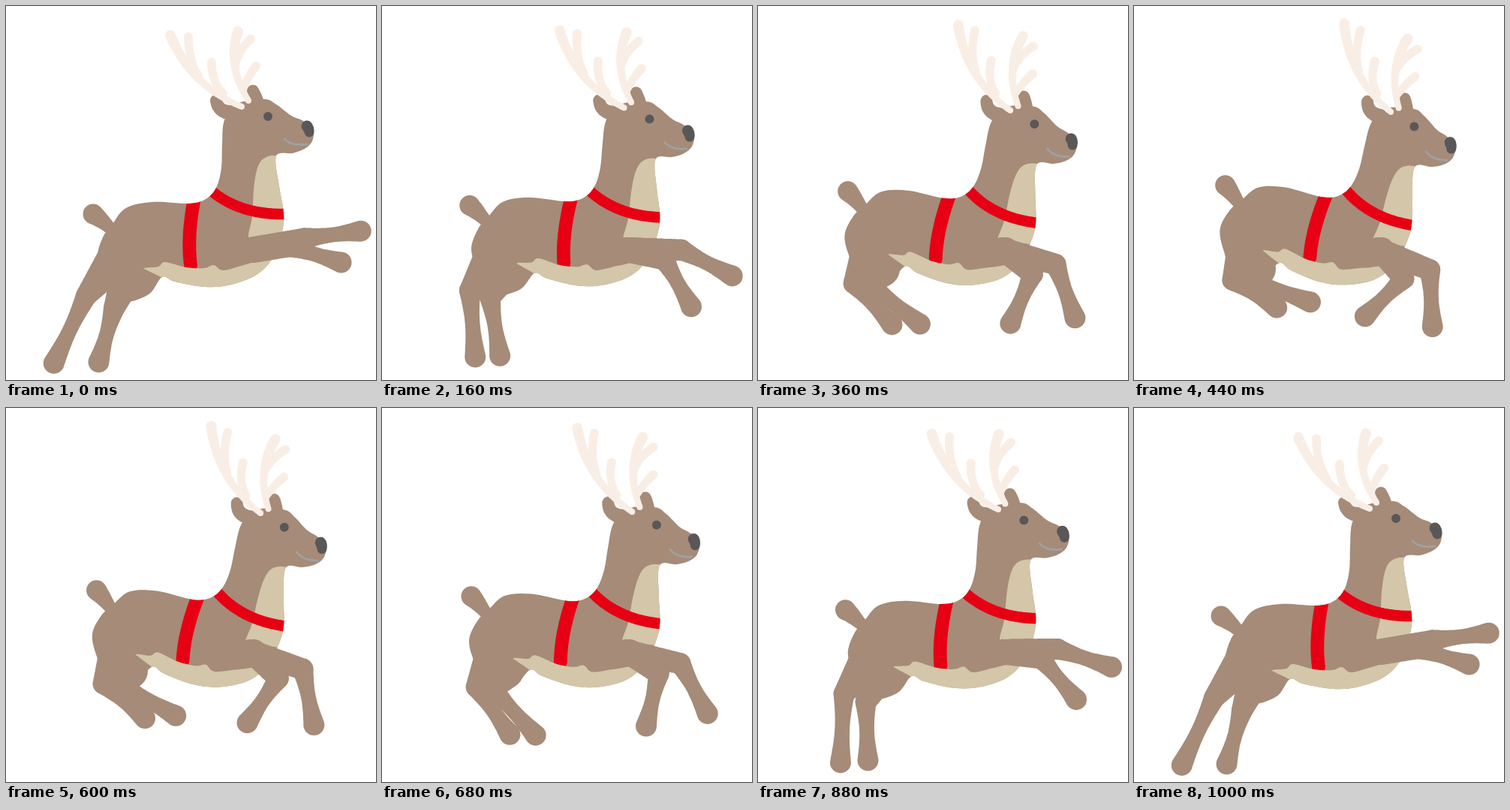
An HTML page with a canvas that plays this animation: 493x498 px, repeating every 1.04 s.

```html
<!DOCTYPE html>
<html>
<head>
<meta charset="utf-8">
<style>
html, body { margin: 0; width: 493px; height: 498px; overflow: hidden; background: #fff }
canvas { display: block }
</style>
</head>
<body>
<canvas width="493" height="498"></canvas>
<script>
const ctx = document.querySelector('canvas').getContext('2d');
const BROWN = '#a58b78', CREAM = '#d3c6a9', RED = '#e70013', ANTLER = '#f9eee5', DARK = '#595758', GREY = '#9fa0a0';
const LOOP = 1040, STEP = 40, HALF = 500;

const points = s => s.split(' ').map(p => p.split(',').map(Number));
const mix = (a, b, k) => a + (b - a) * k;
const middle = (a, b) => [mix(a[0], b[0], .5), mix(a[1], b[1], .5)];
const polar = ([x, y], angle, length) => [x + length * Math.cos(angle), y + length * Math.sin(angle)];

function turn([x, y], [cx, cy], angle) {
  const c = Math.cos(angle), s = Math.sin(angle);
  x -= cx;
  y -= cy;
  return [cx + x * c - y * s, cy + x * s + y * c];
}

// Everything is laid out in the stretched pose
const body = points('142,290 160,269 195,261 245,263 268,256 281,240 287,215 288,185 291,152 308,130 344,124 360,131 380,146 396,153 409,165 408,180 398,190 382,196 360,200 364,240 370,275 368,300 357,333 335,357 300,371 265,374 225,367 208,361 190,384 155,393 133,362 122,335 129,308');
const chest = points('358,199 342,204 334,219 330,245 328,280 323,305 327,308 350,307 385,298 390,240 380,205');
const belly = points('184,349 203,347 212,341 240,348 264,349 277,345 290,352 320,344 365,335 350,380 265,400 215,366 190,353');

// Quadratic curves: start, control, end
const tail = points('116,277 128,285 144,301');
const ears = ['280,126 283,142 302,142', '329,113 332,120 334,129'].map(points);
const girth = points('251,256 241,307 246,345');
const collar = points('270,243 310,279 374,277');
const nose = points('401,160 404,164 404,168');
const mouth = points('371,177 381,187 401,184');
const eye = points('349,147 349,147 349,147');
const antlerBase = [318, 132];
const beams = ['219,39 247,107 314,134', '309,34 294,80 323,126'].map(points);
const tines = ['243,41 243,72 257,93', '274,75 274,102 290,116', '326,44 309,60 306,80', '333,80 323,93 316,110'].map(points);

// Closed smooth outline through the points
function trace(pts) {
  const n = pts.length, at = i => pts[(i + n) % n];
  ctx.beginPath();
  ctx.moveTo(...pts[0]);
  for (let i = 0; i < n; i++) {
    const a = at(i - 1), b = at(i), c = at(i + 1), d = at(i + 2);
    ctx.bezierCurveTo(b[0] + (c[0] - a[0]) / 6, b[1] + (c[1] - a[1]) / 6,
      c[0] - (d[0] - b[0]) / 6, c[1] - (d[1] - b[1]) / 6, ...c);
  }
}

function fill(pts, color) {
  trace(pts);
  ctx.fillStyle = color;
  ctx.fill();
}

// Rounded stroke along a curve, from radius r0 to r1, thinner by waist halfway
function limb([a, c, b], color, r0, r1 = r0, waist = 0) {
  ctx.beginPath();
  for (let t = 0; t <= 1; t += 1 / 64) {
    const [x, y] = [0, 1].map(j => mix(mix(a[j], c[j], t), mix(c[j], b[j], t), t));
    const r = mix(r0, r1, t) - waist * Math.sin(Math.PI * t);
    ctx.moveTo(x + r, y);
    ctx.arc(x, y, r, 0, 2 * Math.PI);
  }
  ctx.fillStyle = color;
  ctx.fill();
}

function leg(hip, thickness, upperAngle, upperLength, lowerAngle, lowerLength) {
  const knee = polar(hip, upperAngle, upperLength);
  const hoof = polar(knee, lowerAngle, lowerLength);
  limb([hip, middle(hip, knee), knee], BROWN, thickness, 14);
  limb([knee, middle(knee, hoof), hoof], BROWN, 14, 14, 4);
}

function draw(ms) {
  const v = 1 - Math.abs(1 - ms / HALF);  // legs: 0 stretched, 1 gathered
  const u = v ** 1.2;                     // body follows with a soft start

  // The trunk rocks about the shoulder, the rump a little more than the head
  const rock = pts => pts.map(p => turn(p, [290, 283], u * (.28 - .000175 * p[0])));
  const sway = pts => rock(pts.map(p => turn(p, antlerBase, u * .1)));
  const torso = rock(body);

  ctx.clearRect(0, 0, 493, 498);
  limb(rock(tail), BROWN, 13.5, 7);
  leg([148, 335], 26, 2.25 - .2 * v, 65 - 35 * v, 2.02 - 1.66 * v, 100 - 35 * v);
  leg([165, 350], 24, 1.95 + .4 * v, 57 - 43 * v, 1.85 - 1.75 * u, 74 + 16 * v);
  ears.forEach(e => limb(rock(e), BROWN, 8, 10));
  fill(torso, BROWN);

  ctx.save();
  trace(torso);
  ctx.clip();
  fill(rock(chest), CREAM);
  limb(rock(girth), RED, 9);
  fill(rock(belly), CREAM);
  limb(rock(collar), RED, 7.3);
  ctx.restore();

  leg([325, 325], 17, -.21 + .65 * v, 74, -.13 + 1.88 * v, 76);
  leg([330, 325], 17, -.1 + 1.15 * v, 48, .3 + 2.35 * v, 72);

  beams.forEach(b => limb(sway(b), ANTLER, 7, 4));
  tines.forEach(t => limb(sway(t), ANTLER, 6, 5));
  limb(rock(nose), DARK, 7.5, 6.5);
  limb(rock(mouth), GREY, 1.5);
  limb(rock(eye), DARK, 6);
}

const start = performance.now();
function tick() {
  const t = (performance.now() - start) % LOOP;
  draw(Math.floor(t / STEP) * STEP);
  requestAnimationFrame(tick);
}
tick();
</script>
</body>
</html>
```
